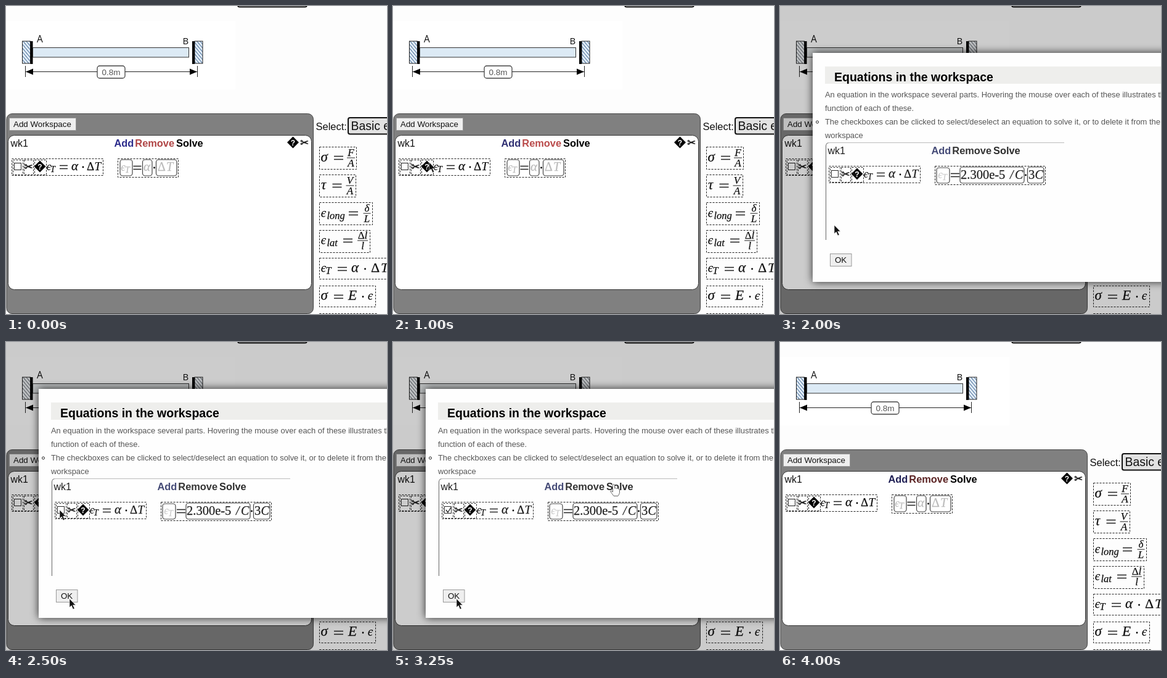
An HTML page for the animation above (4.25 s loop, 618 px wide and 499 px high).

```html
<!DOCTYPE html>
<html lang="en">
<head>
<meta charset="utf-8">
<title>Equation workspace</title>
<style>
html, body { margin: 0; width: 100%; height: 100%; overflow: hidden; background: #fdfdfd; }
svg { display: block; }
text { font-family: "Liberation Sans", Arial, sans-serif; white-space: pre; }
.math { font-family: "Liberation Serif", "Noto Serif", serif; font-style: italic; stroke: currentColor; stroke-width: .25; }
.up { font-style: normal; }
.eps { font-family: "Noto Serif", "DejaVu Sans", serif; font-style: italic; }
.open { font-family: "Open Sans", "Noto Sans", sans-serif; }
.icon { font-family: "DejaVu Sans", sans-serif; stroke: #111; stroke-width: .5; }
.bold { font-weight: bold; }
.dash { fill: none; stroke: #222; stroke-dasharray: 3 2; }
.slot { fill: #fff; stroke: #444; stroke-width: 1.2; }
.line { fill: none; stroke: #222; }
</style>
</head>
<body>
<svg id="stage" width="618" height="499" viewBox="0 0 618 499"></svg>
<script>
const text = (x, y, size, str, cls = '', fill = '#111', more = '') =>
  `<text x="${x}" y="${y}" font-size="${size}" class="${cls}" fill="${fill}" color="${fill}" ${more}>${str}</text>`;
const math = (x, y, str, size = 21, fill, more) => text(x, y, size, str, 'math', fill, more);
const upright = (x, y, str, size, fill) => text(x, y, size, str, 'math up', fill);
const eps = (x, y, size = 18, fill) => text(x, y, size, 'ϵ', 'eps', fill);
const rect = (x, y, right, bottom, more) =>
  `<rect x="${x}" y="${y}" width="${right - x}" height="${bottom - y}" ${more}/>`;
const path = (d, more = 'class="line"') => `<path d="${d}" ${more}/>`;
const dashed = (x, y, right, bottom) => rect(x + .5, y + .5, right + .5, bottom + .5, 'class="dash"');
const slot = (x, y, right, bottom) => rect(x, y, right, bottom, 'rx="4" class="slot"');
const equals = (x, y, w = 15) => path(`M${x} ${y - 2.5}h${w}m0 5h${-w}`, 'class="line" stroke-width="1.3"');
const dot = (x, y) => `<circle cx="${x}" cy="${y}" r="1.4"/>`;
const button = (x, y, right, bottom) => rect(x, y, right, bottom, 'fill="#efefef" stroke="#999"');
const middle = 'text-anchor="middle"';

const fraction = (x, y, top, bottom, w = 13) =>
  path(`M${x - w / 2} ${y}h${w}`) +
  math(x, y - 3, top, 17, '#111', middle) + math(x, y + 14, bottom, 17, '#111', middle);

const badge = (x, y) =>
  path(`M${x} ${y - 9.5}l9.5 9.5l-9.5 9.5l-9.5 -9.5z`, '') +
  text(x, y + 4.5, 12, '?', 'bold', '#fff', middle);

// Toolbar words and the equation row, shared by the page and the dialog
const workspaceRow = id =>
  text(7.5, 228, 16, 'wk1') +
  text(175.5, 228, 16.4, 'Add', 'bold', '#000', `id="${id}Add"`) +
  text(209.3, 228, 16.4, 'Remove', 'bold', '#000', `id="${id}Remove"`) +
  text(276, 228, 16.4, 'Solve', 'bold', id === 'demo' ? '#222' : '#000') +
  dashed(9, 247, 157, 274) + dashed(11, 249, 27, 273) +
  dashed(29, 249, 44, 273) + dashed(46, 249, 65, 273) +
  rect(13.5, 254.5, 24.5, 265.5, 'fill="#fff" stroke="#222"') +
  text(30, 266, 16, '✂', 'icon') + badge(55, 260) +
  eps(65.5, 266, 16) + math(72, 269, 'T', 14) + equals(87, 261, 13) +
  math(106, 266, 'α') + dot(125, 261) +
  upright(131, 266, 'Δ', 19) + math(143.5, 266, 'T', 19);

const diagram = () => {
  const wall = x => rect(x, 57, x + 13, 93, 'fill="#e3edf8"') +
    rect(x, 57, x + 13, 93, 'fill="url(#hatch)" stroke="#222"');
  return rect(0, 24, 372, 135, 'fill="#fff"') +
    wall(26.5) + wall(306) +
    rect(39.5, 57, 43.5, 94, '') + rect(302, 57, 306, 94, '') +
    rect(43.5, 67.5, 296.5, 83, 'fill="#dceaf5" stroke="#333"') +
    text(50, 58.500, 15.5, 'A', 'open') + text(286.5, 62, 15, 'B', 'open') +
    path('M31.5 97v18M310.5 97v18M32 106.5H310') +
    path('M32 106.5l12 -5v10zM310 106.5l-12 -5v10z', '') +
    rect(148, 97, 193, 117, 'rx="4" fill="#fff" stroke="#444" stroke-width="1.3"') +
    text(170.5, 111.5, 13.5, '0.8m', '', '#555', middle);
};

const workspace = () =>
  rect(1, 174.5, 498.5, 498.5, 'rx="9" fill="#808080" stroke="#444"') +
  button(5.5, 181.5, 113.5, 201.5) + text(12, 196, 13.33, 'Add Workspace') +
  rect(3.5, 209.5, 495.5, 459.5, 'rx="10" fill="#fff" stroke="#333"') +
  workspaceRow('page') +
  badge(465.5, 221) + text(477, 227, 16.5, '✂', 'icon') +
  dashed(181, 247, 279, 277) +
  slot(185, 249, 205, 275) + eps(186, 267, 16, '#bbb') + math(193, 270, 'T', 14, '#bbb') +
  equals(206.5, 262, 13) +
  slot(221.5, 249, 237, 275) + math(223, 267, 'α', 21, '#bbb') + dot(240.5, 262) +
  slot(243.5, 249, 277, 275) + upright(246, 267, 'Δ', 20, '#bbb') + math(260, 267, 'T', 20, '#bbb');

const palette = () =>
  rect(376, -20, 488, 1.5, 'rx="3" fill="#eee" stroke="#111" stroke-width="2"') +
  text(502.5, 201, 16.5, 'Select:') +
  rect(555, 181, 640, 207.5, 'rx="3" fill="#e2e2e2" stroke="#111" stroke-width="2"') +
  text(559.5, 201, 19.4, 'Basic e') +
  dashed(508, 228, 568, 264) + math(510.5, 252, 'σ', 23) + equals(532, 246) + fraction(559.5, 246, 'F', 'A') +
  dashed(508, 273, 567, 309) + math(511, 297, 'τ', 23) + equals(529.5, 291) + fraction(558, 291, 'V', 'A') +
  dashed(508, 318, 594, 354) + eps(510.5, 342) + math(520.5, 345, 'long', 16.5) +
  equals(556, 336) + fraction(585.5, 336, 'δ', 'L', 12) +
  dashed(508, 363, 590, 399) + eps(510.5, 386) + math(520.5, 389, 'lat', 16.5) +
  equals(547, 380) + fraction(578.5, 380, '<tspan class="up">Δ</tspan>l', 'l', 17) +
  dashed(508, 408, 640, 442) + eps(510.5, 431) + math(518.5, 434, 'T', 16) +
  equals(538, 426) + math(560, 431, 'α', 23) + dot(582.5, 426) +
  upright(592, 431, 'Δ', 22) + math(608, 431, 'T', 22) +
  dashed(508, 453, 599, 487) + math(510.5, 476, 'σ', 23) + equals(532, 471) +
  math(555, 476, 'E', 23) + dot(579, 471) + eps(586.5, 476) +
  dashed(508, 498, 602, 530);

const dialog = () =>
  rect(0, 0, 618, 499, 'fill="#000" opacity=".2"') +
  rect(53, 76, 660, 447, 'fill="#fefefe" filter="url(#shadow)"') +
  rect(73, 98, 618, 126, 'fill="#eeeeec"') +
  text(88, 122, 19.5, 'Equations in the workspace', 'bold', '#000') +
  ['An equation in the workspace several parts. Hovering the mouse over each of these illustrates the',
   'function of each of these.',
   'The checkboxes can be clicked to select/deselect an equation to solve it, or to delete it from the',
   'workspace'].map((s, i) => text(73, 148 + 22 * i, 12.9, s, '', '#555')).join('') +
  '<circle cx="60.5" cy="188" r="2" class="line"/>' +
  path('M74.5 379V227Q74.5 221.5 80 221.5', 'fill="none" stroke="#666"') +
  path('M78 221.5H461', 'fill="none" stroke="#bbb"') +
  `<g transform="translate(70 12)" opacity=".95">${workspaceRow('demo')}</g>` +
  dashed(251, 259, 430, 289) +
  slot(254, 262, 275, 287) + eps(256, 279, 16, '#ccc') + math(263, 282, 'T', 14, '#ccc') +
  equals(277, 274, 14) +
  slot(292, 261, 396, 287) + upright(293, 279.5, '2.300e-5', 20.5, '#222') +
  math(373, 279.5, '/', 20, '#222') + math(381, 279.5, 'C', 20, '#222') + dot(398.5, 274) +
  slot(401.5, 261, 428, 287) + upright(403, 279.5, '3', 20.5, '#222') + math(413.5, 279.5, 'C', 20, '#222') +
  path('M86 272l3 4l5 -8', 'id="check" class="line" stroke-width="1.3"') +
  button(81.5, 401.5, 116, 421.5) + text(89, 416, 13.33, 'OK') +
  `<g id="demoArrow">${arrow}</g>` +
  path('M-1.5 8V-3.5q1.5 -2 3 0V2q2.5 -1.5 3 .5q2.5 -1 3 .5q2 -.5 2 1.5v5q-1 3 -2.5 5h-7q-3 -4.5 -5.5 -7.5q1 -2.5 4 1z',
    'id="hand" fill="#fff" stroke="#666" transform="translate(358 235)"');

const arrow = path('M0 0V14l3.2 -3l2.6 6l2.4 -1.2l-2.6 -5.600h4.4z', 'fill="#111" stroke="#fff" stroke-width=".6"');

document.getElementById('stage').innerHTML = `
  <defs>
    <pattern id="hatch" width="4" height="4" patternUnits="userSpaceOnUse" patternTransform="rotate(-40)">
      <path d="M.5 0V4" stroke="#4a7099" stroke-width="1"/>
    </pattern>
    <filter id="shadow" x="-10%" y="-10%" width="120%" height="120%">
      <feDropShadow dx="0" dy="0" stdDeviation="7" flood-opacity=".8"/>
    </filter>
    <filter id="muted" color-interpolation-filters="sRGB">
      <feColorMatrix type="saturate" values=".2"/>
    </filter>
  </defs>
  ${rect(0, 0, 618, 499, 'fill="#fdfdfd"')}
  <g id="diagram">${diagram()}</g>${workspace()}${palette()}
  <g id="dialog">${dialog()}</g>
  <g id="pointer">${arrow}</g>`;

const STEP = 250, LOOP = 4250;
const $ = id => document.getElementById(id);
const show = (id, on) => $(id).setAttribute('visibility', on ? 'inherit' : 'hidden');

// Keys are [step, ...values]; values between keys are linear
function track(keys, step) {
  const i = keys.findIndex(k => k[0] >= step);
  if (i < 0) return keys[keys.length - 1].slice(1);
  if (i === 0) return keys[0].slice(1);
  const a = keys[i - 1], b = keys[i], p = (step - a[0]) / (b[0] - a[0]);
  return a.slice(1).map((v, j) => v + (b[j + 1] - v) * p);
}
const place = (id, pos) => $(id).setAttribute('transform', `translate(${pos})`);
const paint = (id, keys, step) => $(id).setAttribute('fill', `rgb(${track(keys, step).map(Math.round)})`);

const pointerPath = [[2, 106, 324], [4, 58.5, 253], [5, 58.5, 253], [8, 88, 355], [9, 98, 399], [10, 103, 416],
  [13, 103, 416], [14, 98, 424], [15, 75, 440]];
const demoPath = [[9, 104, 290], [10, 87, 272], [11, 87, 272], [13, 358, 235]];
const addColor = [[0, 44, 44, 140], [4, 48, 48, 115], [14, 48, 48, 190], [16, 32, 32, 85]];
const removeColor = [[0, 176, 70, 70], [4, 186, 76, 76], [14, 100, 32, 32], [16, 92, 36, 36]];

function draw(now) {
  const step = Math.floor(now % LOOP / STEP);
  const open = step >= 5 && step < 14;
  show('pointer', step >= 2 && step < 16);
  place('pointer', track(pointerPath, step));
  show('dialog', open);
  $('diagram').setAttribute('filter', open ? 'url(#muted)' : 'none');
  show('demoArrow', step >= 9 && step < 13);
  place('demoArrow', track(demoPath, step));
  show('hand', step === 13);
  show('check', step >= 11);
  paint('pageAdd', addColor, step);
  paint('pageRemove', removeColor, step);
  requestAnimationFrame(draw);
}
$('demoAdd').setAttribute('fill', '#3c4270');
$('demoRemove').setAttribute('fill', '#2b2b2b');
requestAnimationFrame(draw);
</script>
</body>
</html>
```
